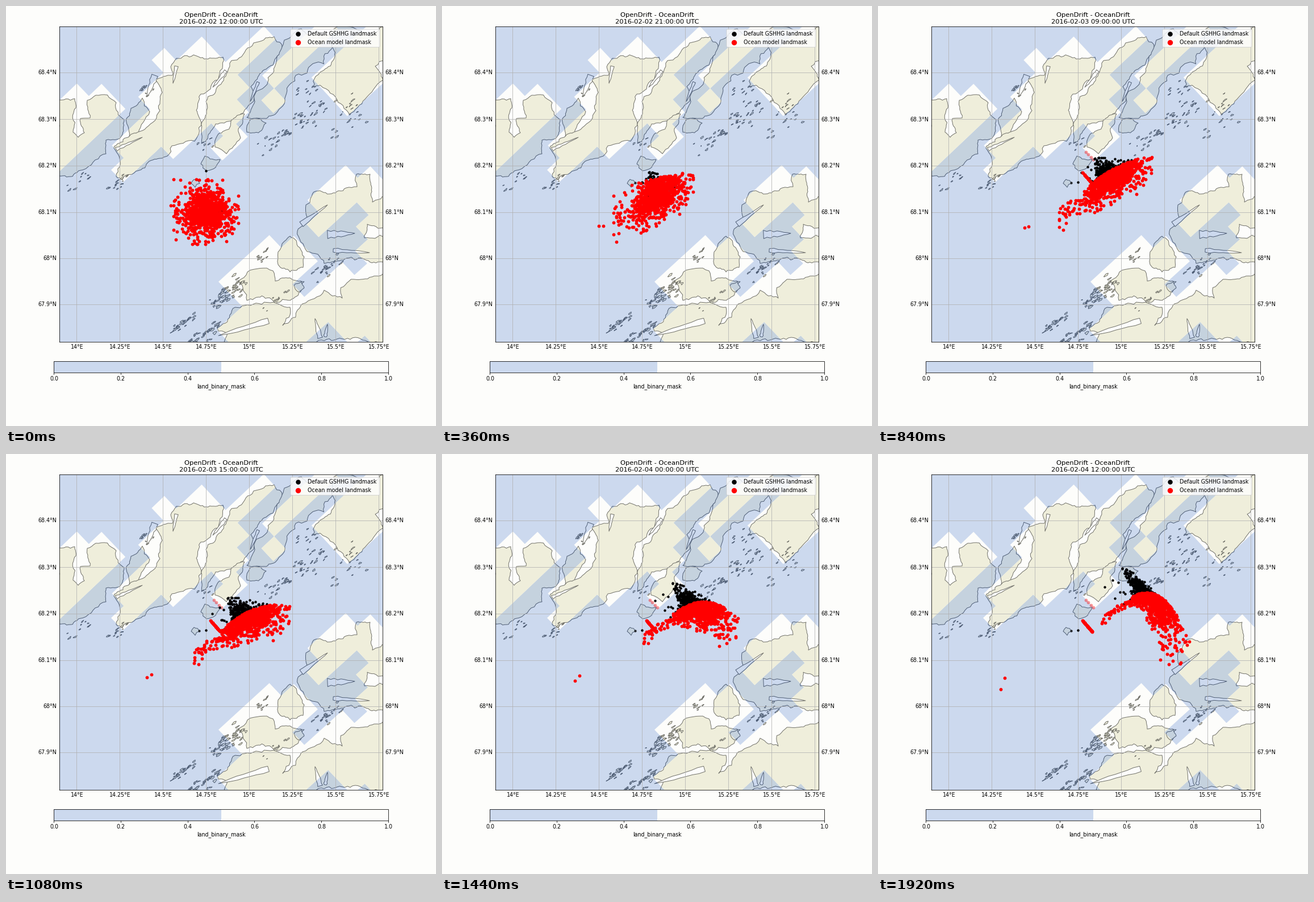
Write a matplotlib script that moves like this. It is 757x739 px and loops after 2040 ms.

```python
import numpy as np
import matplotlib.pyplot as plt
from matplotlib.animation import FuncAnimation
from matplotlib.collections import PolyCollection
from matplotlib.patches import FancyBboxPatch, PathPatch, Rectangle
from matplotlib.path import Path

W, H, DPI = 757, 739, 64
FRAMES, STEP = 17, 120
PAPER, SEA = "#fdfdfb", "#ccd9ee"
CREAM, DIM_LAND = "#efeedb", "#c5d2de"

plt.rcParams["font.family"] = "DejaVu Sans"
rng = np.random.default_rng(12)


def px(v):
    """Pixels to points."""
    return v * 72 / DPI


fig = plt.figure(figsize=(W / DPI, H / DPI), dpi=DPI, facecolor=PAPER)
page = fig.add_axes([0, 0, 1, 1])
page.set(xlim=(0, W), ylim=(H, 0))
page.axis("off")

# The map axes keep page pixel coordinates.
X0, X1, Y0, Y1 = 94, 663, 36, 591
sea = fig.add_axes([X0 / W, 1 - Y1 / H, (X1 - X0) / W, (Y1 - Y0) / H])
sea.set(xlim=(X0, X1), ylim=(Y1, Y0), xticks=[], yticks=[], facecolor=SEA)
for side in sea.spines.values():
    side.set_linewidth(px(0.8))
    side.set_zorder(20)


def label(x, y, text, size=9.56, ha="center", ax=page, **kw):
    return ax.text(x, y, text, fontsize=px(size), ha=ha, va="baseline", **kw)


# ---- model mask: blocks of a slanted grid ------------------------------
blocks = []


def grid(a, b):
    """Page position of a grid node: a runs down left, b down right."""
    return 472 - 22.4 * a + 21 * b, 145 + 20.9 * a + 22.5 * b - 0.064 * a * b


def block(b0, b1, a0, a1):
    ring = [(a0, b0), (a0, b1), (a1, b1), (a1, b0), (a0, b0)]
    blocks.append(Path([grid(a, b) for a, b in ring], closed=True))


# north-west
block(-8, -5, 8, 14)
block(-7, -5, 7, 8)
block(-6, -5, 3, 4)
block(-5, -3, 1, 6)
block(-4, -2, 6, 9)
block(-3, -2, -2, 10)
block(-2, -1, 1, 7)
block(-1, 0, 2, 4)
block(0, 1, 3, 5)
# north-east
block(-1, 0, -5, 0)
block(0, 1, 0, 1)
block(1, 4, -9, -2)
# south-east
block(6, 7, 0, 3)
block(7, 8, -1, 4)
block(8, 10, -3, 1)
block(9, 10, 1, 2)
block(10, 11, -3, 3)
block(6, 8, 6, 10)
block(7, 8, 5, 6)
block(8, 9, 5, 12)
block(9, 12, 7, 14)
block(10, 12, 4, 7)
block(11, 15, -4, 6)
block(12, 14, 6, 7)
mask = Path.make_compound_path(*blocks)

# ---- coast -------------------------------------------------------------
lands, fjords = [], []


def bend(p, q, amount):
    """Midpoint displacement from p up to, not including, q."""
    d = q - p
    size = np.hypot(*d)
    if size < 6:
        return [p]
    m = (p + q) / 2 + np.array([-d[1], d[0]]) * rng.normal(0, amount)
    return bend(p, m, amount) + bend(m, q, amount)


def land(*pts):
    pts = np.array(pts, float)
    ring = []
    for p, q in zip(pts, np.roll(pts, -1, axis=0)):
        ring += bend(p, q, 0.1)
    lands.append(np.array(ring))


def fjord(xa, ya, xb, yb, width=6):
    """A slit, widest near its mouth at (xa, ya)."""
    k = np.linspace(0, 1, 9)
    d = np.array([xb - xa, yb - ya])
    n = np.array([-d[1], d[0]]) / np.hypot(*d)
    mid = np.array([xa, ya]) + k[:, None] * d
    half = (width / 2 * (1 - k) ** 0.6 * rng.uniform(0.6, 1.2, 9))[:, None] * n
    fjords.append(np.vstack([mid + half, (mid - half)[::-1]]))


def islets(n, x, y, along, across, size=1.7):
    """Small slanted islands around a point, spread towards north-east."""
    for _ in range(n):
        s, t = along * rng.uniform(-1, 1), rng.normal(0, across)
        ang = np.sort(rng.uniform(0, 2 * np.pi, 6))
        r = size * rng.uniform(0.5, 1.5)
        u, v = r * 1.7 * np.cos(ang), r * 0.6 * np.sin(ang)
        lands.append(np.c_[x + 0.8 * s + 0.6 * t + 0.8 * u + 0.6 * v,
                           y - 0.6 * s + 0.8 * t - 0.6 * u + 0.8 * v])


# western island
land((90, 164), (121, 163), (119, 188), (118, 222), (127, 231), (138, 223),
     (131, 198), (148, 197), (143, 166), (158, 157), (194, 170), (208, 200),
     (205, 226), (176, 236), (176, 260), (141, 286), (90, 298))
# long island with its narrow western neighbour
land((217, 230), (220, 180), (240, 162), (253, 186), (233, 224))
land((190, 250), (232, 222), (247, 214), (271, 184), (275, 152), (262, 128),
     (293, 122), (290, 107), (300, 92), (330, 86), (382, 90), (381, 110),
     (360, 146), (343, 155), (342, 200), (332, 238), (292, 246), (284, 264),
     (238, 288), (205, 306), (194, 300), (200, 283))
land((352, 168), (390, 116), (397, 96), (457, 56), (472, 54), (480, 86),
     (470, 104), (431, 142), (441, 152), (418, 188), (384, 206), (344, 242),
     (353, 190))
land((372, 228), (404, 196), (420, 190), (409, 216), (413, 232), (388, 260),
     (368, 248))
land((424, 196), (441, 150), (470, 118), (490, 60), (520, 40), (577, 50),
     (575, 72), (530, 118), (510, 122), (478, 186), (458, 198))
land((424, 222), (430, 200), (458, 206), (450, 219))
# north-eastern land
land((545, 124), (579, 88), (575, 64), (590, 32), (668, 32), (668, 96),
     (650, 106), (664, 130), (632, 164), (605, 192), (580, 160), (541, 142))
# small islands off the drift start
land((343, 278), (350, 264), (377, 270), (369, 284), (353, 290))
land((326, 312), (331, 305), (341, 312), (333, 319))
# south-eastern land
land((513, 396), (530, 372), (528, 350), (545, 326), (599, 320), (618, 318),
     (617, 296), (641, 296), (645, 345), (668, 334), (668, 390), (636, 384),
     (631, 408), (668, 406), (668, 450), (560, 453), (530, 432))
land((479, 455), (490, 414), (500, 405), (517, 425), (523, 460), (500, 468))
land((409, 484), (425, 468), (470, 466), (474, 484), (525, 485), (520, 500),
     (424, 518))
land((668, 470), (604, 484), (592, 514), (560, 500), (522, 524), (487, 562),
     (500, 530), (420, 527), (372, 566), (390, 576), (384, 595), (668, 595))
land((507, 492), (520, 485), (525, 496), (514, 503))

fjord(262, 122, 248, 160, 12)
fjord(300, 106, 294, 136)
fjord(387, 114, 364, 143, 8)
fjord(194, 252, 240, 231)
fjord(444, 134, 430, 168)
fjord(462, 554, 374, 580, 12)
fjord(553, 584, 544, 550, 10)
fjord(562, 582, 566, 560)
fjord(520, 384, 566, 350, 10)
fjord(566, 402, 614, 400, 14)
fjord(576, 430, 640, 434, 8)

islets(10, 128, 308, 28, 5)
islets(14, 197, 312, 22, 5)
islets(9, 245, 146, 12, 8)
islets(7, 350, 247, 16, 5)
islets(22, 473, 236, 38, 6)
islets(32, 532, 192, 34, 11)
islets(10, 530, 150, 18, 6)
islets(12, 600, 211, 34, 8)
islets(12, 610, 170, 38, 8)
islets(34, 402, 496, 20, 7, 2.2)
islets(22, 374, 520, 18, 6, 2.2)
islets(24, 314, 558, 28, 4, 2)
islets(36, 344, 580, 38, 6, 2.8)
islets(10, 452, 439, 16, 4)
islets(9, 475, 520, 28, 4)
islets(24, 566, 458, 30, 7)


def coast(shapes, fill, edge_color, z, clip=False):
    layer = PolyCollection(shapes, facecolors=fill, edgecolors=edge_color,
                           linewidths=px(0.95), zorder=z)
    sea.add_collection(layer, autolim=False)
    if clip:
        layer.set_clip_path(mask, sea.transData)
        layer.set_clip_box(sea.bbox)


coast(lands, DIM_LAND, "#4b5a72", 2)
coast(fjords, SEA, "#4b5a72", 2.1)
# The same coast again, in the lighter tones of the masked cells.
sea.add_patch(PathPatch(mask, fc=PAPER, ec="none", zorder=2.5))
coast(lands, CREAM, "#6d6d66", 3, True)
coast(fjords, PAPER, "#6d6d66", 3.1, True)

# ---- grid and labels ---------------------------------------------------
for i in range(8):
    x = 124.4 + 75.97 * i
    sea.axvline(x, color="#b0b0b0", lw=px(0.77), zorder=4)
    label(x + 0.4, 603, f"{14 + i / 4:g}°E")
for i in range(6):
    y = 117.2 + 82.2 * i - 0.12 * i ** 2
    name = f"{68.4 - i / 10:.3g}°N"
    sea.axhline(y, color="#b0b0b0", lw=px(0.77), zorder=4)
    label(89.5, y + 3.3, name, ha="right")
    label(667.5, y + 3.3, name, ha="left")

label(378.5, 18.6, "OpenDrift - OceanDrift", 11.48)
clock = label(378.5, 30.6, "", 11.48)

# ---- colour bar --------------------------------------------------------
page.add_patch(Rectangle((84, 625), 294.5, 19.5, fc=SEA, ec="none"))
page.add_patch(Rectangle((84, 625), 589, 20, fc="none", ec="k", lw=px(0.8)))
for i in range(6):
    x = 84 + 117.8 * i
    page.plot([x, x], [645, 648.3], color="k", lw=px(0.8))
    label(x + 0.4, 659.3, f"{i / 5:.1f}")
label(378.5, 672, "land_binary_mask")

# ---- legend ------------------------------------------------------------
sea.add_patch(FancyBboxPatch((503, 43), 153, 27.5, fc="white", ec="#cccccc",
                             boxstyle="round,pad=2,rounding_size=2",
                             lw=px(0.95), alpha=0.8, zorder=14))
for y, color, size, text in ((49, "k", 8.4, "Default GSHHG landmask"),
                             (63.6, "r", 9.4, "Ocean model landmask")):
    sea.plot(514, y, "o", color=color, ms=px(size), mew=0, zorder=15)
    label(531, y + 3.3, text, ha="left", ax=sea, zorder=15)

# ---- drifters ----------------------------------------------------------
u, v = rng.normal(size=(2, 1000)).clip(-2.7, 2.7)
black_u = -1.1 + np.abs(rng.normal(size=330)).clip(0, 2.6)
black_v = np.abs(rng.normal(size=330)).clip(0, 2.2)
late = np.maximum(0, rng.normal(size=330) - 1.2)
shore = rng.random(65)
landing = rng.uniform(0.2, 0.8, 65)


def spine(t, s):
    """Curve through the cloud: it tilts north-east, then bends over."""
    s = s / 2
    x = 352 + 136 * t + (42 + 10 * np.sin(np.pi * t)) * s
    y = 255 + 107 * (1 - t) ** 1.5
    tilt = -32 * np.sin(1.3 * np.pi * t)
    return x, y + tilt * s + 26 * t ** 1.5 * s ** 2


def lag(t):
    return 60 * t * (1 - 0.5 * t)


def red_cloud(t):
    x, y = spine(t, u)
    # The shore folds the upper half of the cloud back down.
    k = (0.5 + 4 * np.exp(-7 * t)) * (1 - 0.2 * u)
    width = (21 - 7 * t) * (1 + 0.55 * t ** 2 * u).clip(0.5, 2.4)
    off = width * (np.abs(v + k) - k)
    tail = lag(t) * np.maximum(0, -u - 1.6)
    x, y = x - 0.4 * t ** 4 * off - tail, y + off + 0.6 * tail
    on = shore[landing <= t]
    fade = np.exp(-20 * t)
    return (np.r_[x, 359.5 + 18.5 * on, 290 - 74 * t, 298 - 75 * t],
            np.r_[y, 292.5 + 21 * on, 388 - 37 * fade + 26 * t ** 3,
                  387 - 21 * fade + 7 * t ** 3])


def black_cloud(t):
    x, y = spine(t, black_u + 0.5 - t)
    up = 23 * min(1, 6 * t) * black_v
    up = up * (1 - 0.33 * (black_u + 1.1)).clip(0.25, 1)
    back = lag(t) * late
    return x + (0.25 - 0.75 * t) * up - back, y - up + 0.5 * back


def dots(color, size, z, alpha=1):
    return sea.plot([], [], "o", color=color, ms=px(size), mew=0,
                    alpha=alpha, zorder=z)[0]


black = dots("k", 4.4, 6)
red = dots("r", 5.8, 7)
beached = dots("r", 5.8, 5, 0.4)
beached_black = dots("k", 4.4, 5, 0.75)


def draw(i):
    t = i / (FRAMES - 1)
    hour = 12 + 3 * i
    clock.set_text(f"2016-02-{2 + hour // 24:02d} {hour % 24:02d}:00:00 UTC")
    bx, by = black_cloud(t)
    black.set_data(np.r_[bx, 352], np.r_[by, 290 if i == 0 else 310])
    red.set_data(*red_cloud(t))
    step = np.arange(np.clip(i - 3, 0, 4))
    beached.set_data(366 + 4.3 * step, 257 + 4.3 * step)
    beached_black.set_data(*([[340], [311]] if i > 2 else [[], []]))
    return clock, black, red, beached, beached_black


anim = FuncAnimation(fig, draw, frames=FRAMES, interval=STEP,
                     init_func=lambda: draw(0), repeat=True, repeat_delay=0)
plt.show()
```
